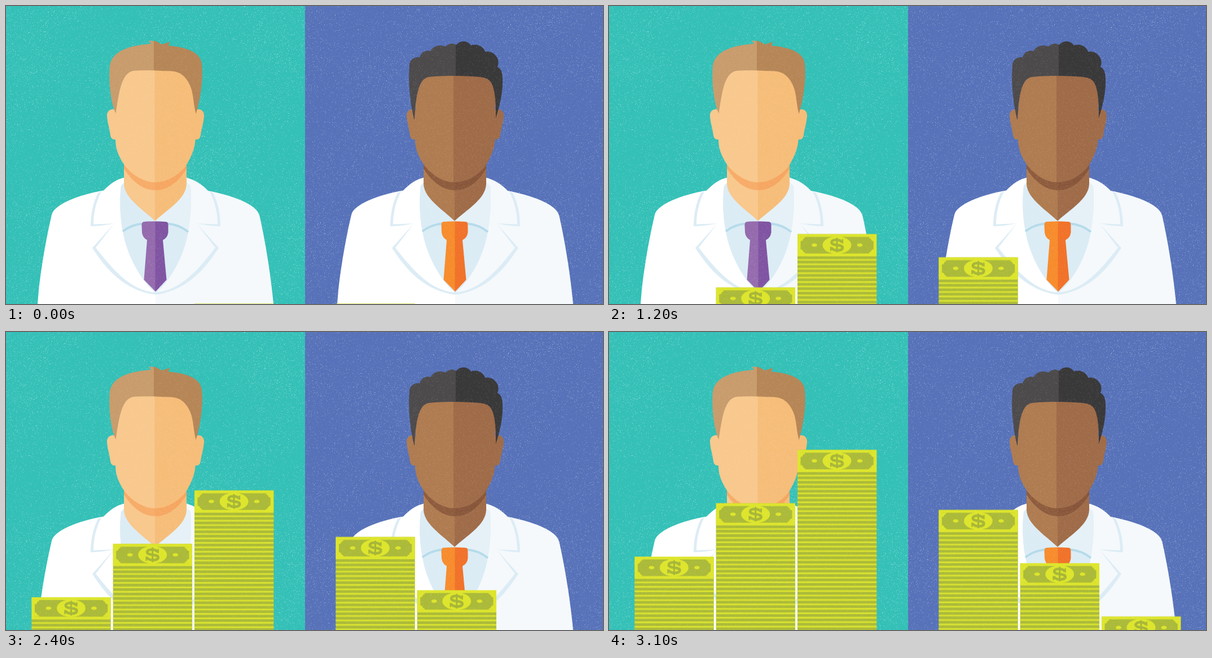
Animation, 1058 px wide and 529 px high, one loop 3.2 s. Source, as an HTML page with a canvas:

```html
<!DOCTYPE html>
<html lang="en">
<head>
<meta charset="utf-8">
<title>Two doctors and their pay</title>
<style>
  html, body { margin: 0; width: 100%; height: 100%; overflow: hidden; }
  body {
    position: relative;
    background: linear-gradient(90deg, #34c0b7 530px, #5772b9 530px);
  }
  canvas, svg { position: absolute; left: 0; top: 0; width: 1058px; height: 529px; }
  .pay { animation: rise 3.2s steps(32) infinite; }
  .left { --rise: -329.6px; }
  .right { --rise: -219.5px; }
  @keyframes rise { to { transform: translateY(var(--rise)); } }
</style>
</head>
<body>
<canvas id="back" width="1058" height="529"></canvas>
<svg viewBox="0 0 1058 529">
  <defs>
    <path id="corner" d="M5 5H14Q13 8 10 8.500Q10 12 5 13Z" fill="#dde52c"/>
    <g id="stack">
      <path d="M0 0H140.300V345H0Z" fill="#abba39"/>
      <path d="M70.150 44.200V345" stroke="#d9e22e" stroke-width="140.300" stroke-dasharray="3.080 4.800"/>
      <path d="M0 0H140.300V39.500H0ZM5.500 5V34.500H134.800V5Z" fill="#dde52c" fill-rule="evenodd"/>
      <use href="#corner"/>
      <use href="#corner" transform="matrix(-1 0 0 1 140.300 0)"/>
      <use href="#corner" transform="matrix(1 0 0 -1 0 39.500)"/>
      <use href="#corner" transform="matrix(-1 0 0 -1 140.300 39.500)"/>
      <g fill="#dde52c">
        <ellipse cx="70" cy="19.500" rx="25.500" ry="15.500"/>
        <ellipse cx="30" cy="19.500" rx="5" ry="3"/>
        <ellipse cx="110.500" cy="19.500" rx="5" ry="3"/>
      </g>
      <g fill="none" stroke="#a7b637">
        <path d="M79 15C77 9 61 8.500 60.500 14.500C60 21.500 80.500 17.500 80 24.500C79.500 31 61.500 30 60 23.500" stroke-width="4.600"/>
        <path d="M70 6.500V32.500" stroke-width="3"/>
        <path d="M80 9V16.500M59 22.500V30" stroke-width="2.400"/>
      </g>
    </g>
    <g id="lapel" fill="#dcecf5">
      <path d="M163 332C154 350 150 370 150 391C165 391 179 388.500 192 386L155 387.500C155 368 159 349 169 329Z"/>
      <path d="M192 386L153 429.500C175 463 207 505 265 512.500V508.500C222 506 189 468 159 429Z"/>
    </g>
  </defs>
  <g id="people"></g>
  <g class="pay left">
    <use href="#stack" x="334" y="528.500"/>
    <use href="#stack" x="189.700" y="623.200"/>
    <use href="#stack" x="45.400" y="718"/>
  </g>
  <g class="pay right">
    <use href="#stack" x="584.400" y="528.500"/>
    <use href="#stack" x="728.700" y="623"/>
    <use href="#stack" x="873" y="717.800"/>
  </g>
</svg>
<canvas id="front" width="1058" height="529"></canvas>
<script>
  const people = [
    {
      id: 'a', x: 0, faceSplit: 263.5, hairSplit: 262,
      skin: ['#f8c88d', '#f6bd79'], shade: ['#f7ac69', '#f6a661'],
      hair: ['#c89c6c', '#b68657'], tie: ['#956bae', '#8054a2'],
      cut: `M194.500 191C186 172 182 140 183.500 111C184 86 206 71 257 67L253 61
        Q260 63 263 61.500Q269 64 276 68Q282 67 290 63.500L288 70.500
        C320 73 343 82 346.500 100C350 124 346 160 336.500 192
        C332 172 332 158 328 146C321 126 309 116 292 115.500C270 115 245 113 226 115
        C204 118 200 156 194.500 191Z`
    },
    {
      id: 'b', x: 531, faceSplit: 262, hairSplit: 266,
      skin: ['#af7b50', '#9f6b48'], shade: ['#8e5b3d', '#88563a'],
      hair: ['#4d4a4b', '#3a393a'], tie: ['#f78c2d', '#f1722a'],
      cut: `M193 203C186 180 181 135 184 108A15 15 0 0 1 202 91A15 15 0 0 1 221 80
        A21 21 0 0 1 248 72A15 15 0 0 1 267 69A16 16 0 0 1 293 70A19 19 0 0 1 318 81
        A20 20 0 0 1 340 108Q349 112 349 130C350 155 343 180 337 199
        C337 178 337 160 332 143C327 127 316 126 295 125C270 123.500 240 123.500 218 126
        C200 129 195 160 193 203Z`
    }
  ];

  // Two flat tones meeting at a vertical line
  const split = (id, x, [a, b]) => `
    <linearGradient id="${id}" gradientUnits="userSpaceOnUse" x1="${x - .4}" x2="${x + .4}" y1="0" y2="0">
      <stop stop-color="${a}"/><stop offset="1" stop-color="${b}"/>
    </linearGradient>`;

  const shape = (fill, d) => `<path fill="${fill}" d="${d}"/>`;

  function doctor(p) {
    const tone = name => `url(#${name}-${p.id})`;
    const grad = (name, x, pair) => split(`${name}-${p.id}`, x, pair);
    return `<g transform="translate(${p.x})"><defs>
      ${grad('coat', 265, ['#ffffff', '#f5f9fc'])}
      ${grad('collar', 264.5, ['#dcecf5', '#e5f1f7'])}
      ${grad('skin', p.faceSplit, p.skin)}
      ${grad('neck', 264, p.skin)}
      ${grad('shade', 264, p.shade)}
      ${grad('hair', p.hairSplit, p.hair)}
      ${grad('tie', 264.5, p.tie)}</defs>
      ${shape(tone('coat'), `M56 529C60 470 74 400 81 371C84 353 128 335 173 327.500
        C184 316 196 307 212 304H317C335 308 348 317 358 328C399 336 445 351 449.500 373
        C460 420 469 475 474 529Z`)}
      <use href="#lapel"/><use href="#lapel" transform="matrix(-1 0 0 1 530 0)"/>
      ${shape('#dbecf5', `M210 313L204 319C201 345 202 375 207 400C213 440 240 490 265 509
        C290 490 316 445 323 400C328 370 329 345 327 319L320 313Z`)}
      ${shape(tone('collar'), `M210 313L204 319C201 345 202 375 207 400Q222 388 244 385H285
        Q307 388 323 400C328 370 329 345 327 319L320 313Z`)}
      <path d="M207 400Q222 388 244 386M285 386Q307 388 323 401" fill="none" stroke="#b5dbea" stroke-width="4"/>
      ${shape(tone('neck'), 'M209 278V316C210 341 241 360 264 381.500C288 360 319 342 320 316V278Z')}
      ${shape(tone('shade'), 'M209 278V289C226 315 245 327 264.500 327C285 327 304 315 320 289V278Z')}
      ${shape(tone('skin'), `M197 186C189 180 178 184 179 196C180 209 184 219 185 230
        Q187 239 195 236.500H335Q343 239 345 229C346 219 350 209 351 196C352 184 341 180 333 186Z`)}
      ${shape(tone('skin'), `M195 185L194 238C194 252 199 268 212 285C225 301 245 313 264 313
        C285 313 305 301 318 285C328 269 335 252 335.500 238V185C340 150 336 112 316 102H212
        C194 112 190 150 195 185Z`)}
      ${shape(tone('hair'), p.cut)}
      ${shape(tone('tie'), `M244 383Q264 381.500 284 383Q288 384 287.500 390V402
        Q286 412 278 415.500L284.500 486L265 507L244.500 486L250 415.500Q242 411 241 402L240.500 390Q240 384 244 383Z`)}
    </g>`;
  }
  document.getElementById('people').innerHTML = people.map(doctor).join('');

  function random(seed) {
    return () => {
      seed = (seed + 0x6d2b79f5) | 0;
      let t = Math.imul(seed ^ (seed >>> 15), 1 | seed);
      t = (t + Math.imul(t ^ (t >>> 7), 61 | t)) ^ t;
      return ((t ^ (t >>> 14)) >>> 0) / 4294967296;
    };
  }

  // White specks; chance(x, y) sets how many, alpha how bright
  function grain(id, seed, alpha, chance) {
    const ctx = document.getElementById(id).getContext('2d');
    const { width, height } = ctx.canvas;
    const img = ctx.createImageData(width, height);
    const rnd = random(seed);
    for (let y = 0, i = 0; y < height; y++) {
      for (let x = 0; x < width; x++, i += 4) {
        if (rnd() > chance(x, y)) continue;
        img.data.fill(255, i, i + 3);
        img.data[i + 3] = 255 * alpha * (.4 + .6 * rnd());
      }
    }
    ctx.putImageData(img, 0, 0);
  }

  const patch = (x, y) => 1 + .5 * Math.sin(x / 47 + Math.sin(y / 39)) * Math.sin(y / 58 + x / 131);
  const weave = (x, y) => (x + 2 * y) % 5 === 0;

  grain('back', 7, .45, (x, y) =>
    patch(x, y) * (x < 530 ? .035 : weave(x, y) ? .09 : .01));
  grain('front', 23, .16, (x, y) => patch(x, y) * (weave(x, y) ? .3 : .03));
</script>
</body>
</html>
```
